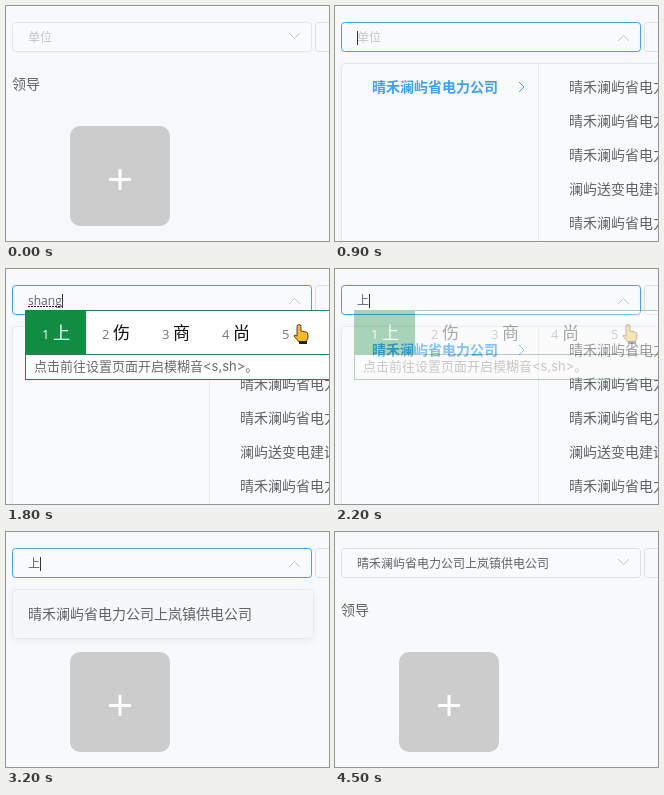
Write an HTML page that moves like this. It is 323 px wide and 235 px high and loops after 5.6 s.

```html
<!DOCTYPE html>
<html lang="zh-CN">
<head>
<meta charset="utf-8">
<title>单位选择</title>
<style>
  html, body { margin: 0; width: 100%; height: 100%; overflow: hidden; background: #f8f9fb; }
  svg { display: block; width: 100vw; height: 100vh; }
  text { font: 14px "Open Sans", "Noto Sans CJK SC", "Noto Sans CJK", sans-serif; fill: #606266; }
  .small { font-size: 12px; }
  .chevron { fill: none; stroke: #c0c4cc; }
  .panel { fill: #f9fafb; stroke: #e4e7ed; }
  .shadow { filter: drop-shadow(0 2px 4px #0000000f); }
  #cascade, #suggest { transform-origin: 0 57px; }
  #ime text { font-size: 13px; fill: #777; }
  #ime .word { font-size: 17px; fill: #111; }
  #ime .active { fill: #fff; }
  #ime .hint { font-family: Inter, "Noto Sans CJK SC", "Noto Sans CJK", sans-serif; fill: #6b6b6b; }
</style>
</head>
<body>
<svg viewBox="0 0 323 235">
  <text x="6" y="83">领导</text>
  <rect x="64" y="120" width="100" height="100" rx="10" fill="#ccc"/>
  <path d="M103 173.5h22M114 163v21" stroke="#fff" stroke-width="3"/>

  <rect x="309.5" y="16.5" width="300" height="29" rx="3" fill="none" stroke="#dcdfe6"/>
  <rect id="field" x="6.5" y="16.5" width="299" height="29" rx="3" fill="#f9fafc"/>
  <path id="arrow" class="chevron" d="M283 27l5.5 5.5 5.5-5.5"/>
  <text id="value" class="small" x="22" y="36"></text>
  <path id="underline" stroke="#222" stroke-dasharray="2 1"/>
  <path id="caret" stroke="#333"/>

  <g id="cascade">
    <rect class="panel shadow" x="6.5" y="57.5" width="400" height="204" rx="4"/>
    <path d="M203.5 58v190" stroke="#e4e7ed"/>
    <text x="37" y="86" style="font-weight:bold;fill:#409eff">晴禾澜屿省电力公司</text>
    <path class="chevron" d="M184 76l5 5-5 5" style="stroke:#409eff"/>
    <g id="rows"></g>
  </g>

  <g id="suggest">
    <rect class="panel shadow" x="6.5" y="57.5" width="301" height="49" rx="4" style="fill:#f6f7fb"/>
    <text id="match" x="22" y="87"></text>
  </g>

  <g id="ime">
    <rect x="19.5" y="41.5" width="400" height="69" fill="#fff" stroke="#2f7d52"/>
    <rect x="20" y="41" width="60" height="44" fill="#118c40"/>
    <path d="M20 85.5h303" stroke="#2f7d52"/>
    <g id="candidates"></g>
    <g id="hand">
      <path d="M291 67V57.5q0-2 2-2t2 2V62l5 1q2 .5 2 3v3l-2 4h-7l-5-6q0-2 3 0z" fill="#fbb92e" stroke="#222" stroke-width=".8"/>
      <path d="M293 72h8v3h-8z" fill="#222"/>
    </g>
    <text class="hint" x="28" y="102">点击前往设置页面开启模糊音&lt;s,sh&gt;。</text>
  </g>
</svg>
<script>
const LOOP = 5600, STEP = 100;
const COMPANY = '晴禾澜屿省电力公司';
const BRANCH = COMPANY + '上岚镇供电公司';
const CANDIDATES = ['是上时说事', '是上时说事', '啥沙傻杀厦', '山善闪删衫', '上伤商尚赏'];

const el = id => document.getElementById(id);
const clamp = v => Math.max(0, Math.min(1, v));
const progress = (t, from, to) => clamp((t - from) / (to - from));
const easeOut = p => 1 - (1 - p) ** 3;
const within = (t, from, to) => t >= from && t < to;
const mix = (a, b, p) => `color-mix(in srgb, ${a}, ${b} ${p * 100}%)`;
const show = (id, visible) => { el(id).style.display = visible ? '' : 'none'; };

el('match').textContent = BRANCH;
el('rows').innerHTML = [COMPANY, COMPANY, COMPANY, '澜屿送变电建设', COMPANY]
  .map((name, i) => `<text x="234" y="${86 + i * 34}">${name}</text>`).join('');
el('candidates').innerHTML = [...CANDIDATES[0]].map((_, i) => {
  const x = 36 + i * 60, active = i ? '' : 'active';
  return `<text class="${active}" x="${x}" y="70">${i + 1}</text>
    <text class="word ${active}" x="${x + 11}" y="70"></text>`;
}).join('');
const words = document.querySelectorAll('.word');

function borderColor(t) {
  if (t < 500) return mix('#dfe8ec', '#c0c4cc', progress(t, 100, 300));
  if (t < 4200) return mix('#c0c4cc', '#409eff', progress(t, 500, 800) ** 1.25);
  return mix('#409eff', '#dcdfe6', progress(t, 4200, 4500));
}

function draw(t) {
  const open = easeOut(progress(t, 600, 900)) - easeOut(progress(t, 4200, 4500));
  const typed = Math.min(5, Math.floor((t - 1300) / STEP) + 1);
  const composing = within(t, 1300, 2200);
  const chosen = t >= 4300;

  el('field').style.stroke = borderColor(t);
  el('arrow').setAttribute('transform', `rotate(${180 * open} 288.5 31)`);

  const value = el('value');
  value.textContent = chosen ? BRANCH : composing ? 'shang'.slice(0, typed) : t < 1300 ? '单位' : '上';
  value.style.fill = t < 1300 ? '#c0c4cc' : '#606266';

  const end = t < 1300 ? 22 : 22 + value.getComputedTextLength();
  el('underline').setAttribute('d', `M22 37.5H${end}`);
  show('underline', composing);
  el('caret').setAttribute('d', `M${Math.round(end) + .5} 25v14`);
  show('caret', within(t, 500, 1000) || within(t, 1300, 2800) || within(t, 3200, 3700));

  for (const [id, from, to] of [['cascade', 600, 2500], ['suggest', 2500, 4500]]) {
    show(id, within(t, from, to));
    el(id).style.opacity = open;
    el(id).style.transform = `scaleY(${open})`;
  }

  show('ime', within(t, 1300, 2300));
  el('ime').style.opacity = t < 2200 ? 1 : .35;
  show('hand', t >= 1800);
  if (typed > 0) words.forEach((word, i) => {
    word.textContent = i === 4 && t >= 1800 ? '' : CANDIDATES[typed - 1][i];
  });
}

const start = performance.now();
function tick() {
  const t = (performance.now() - start) % LOOP;
  draw(Math.floor(t / STEP) * STEP);
  requestAnimationFrame(tick);
}
tick();
</script>
</body>
</html>
```
